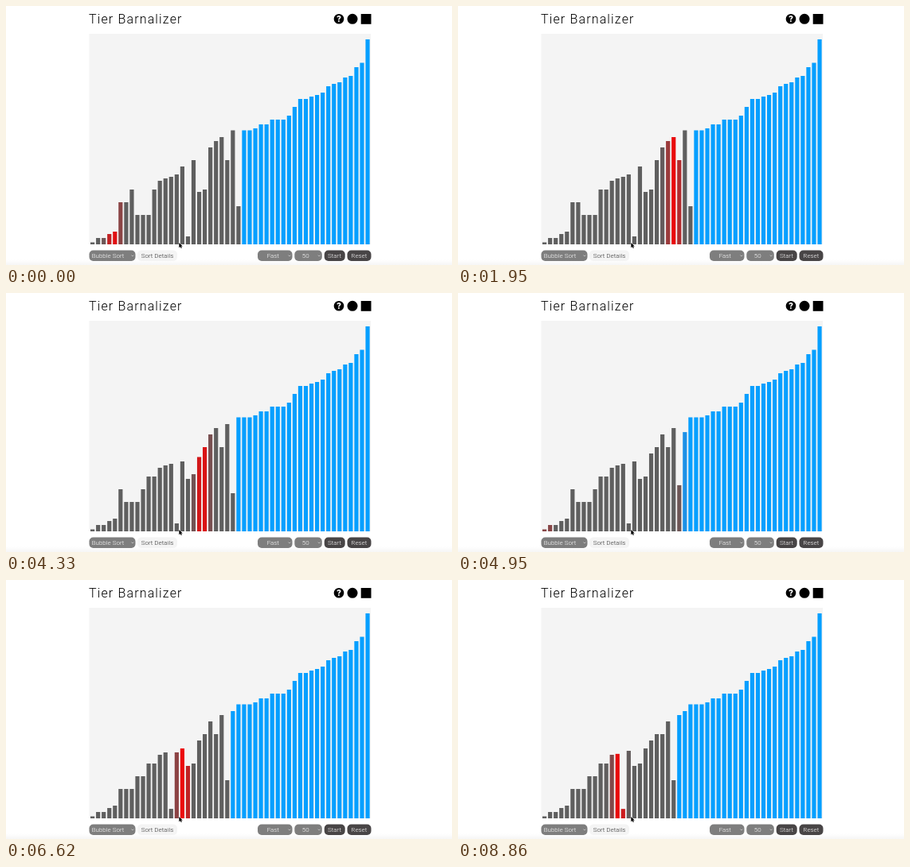
Animation, 560 px wide and 326 px high, one loop 8.9 s. Source, as an HTML page with a canvas:

```html
<!DOCTYPE html>
<html lang="en">
<head>
<meta charset="utf-8">
<title>Tier Barnalizer</title>
<style>
  html, body { margin: 0; width: 100%; height: 100%; overflow: hidden; background: #fff; }
  canvas { display: block; width: 560px; height: 326px; }
</style>
</head>
<body>
<canvas id="stage"></canvas>
<script>
const W = 560, H = 326, LOOP = 8900, FPS = 21;
const STEP = 101.1, FADE = 250, BEGIN = -50 - 4 * STEP;
const BASE = 300, LEFT = 106, PITCH = 7.05, BAR = 5.2;
const GREY = [95, 95, 95], RED = [240, 5, 8], BLUE = [6, 159, 255];
const FONT = 'Roboto, "Open Sans", sans-serif';

const heights = [
  2.5, 8, 8, 13, 16, 53, 53, 69, 37, 37, 37, 69, 80, 83, 85, 88, 98, 10, 106, 66, 69, 122, 130, 135, 106,
  143.5, 48, 143.5, 143.5, 146, 151, 151, 157, 157, 157, 162, 173, 183, 183, 186, 188, 191, 199, 202, 204,
  210, 212, 223, 228.5, 258
];
const FIRST_SORTED = 27, PASSES = 4;

const canvas = document.getElementById('stage');
const ctx = canvas.getContext('2d');
const dpr = window.devicePixelRatio || 1;
canvas.width = W * dpr;
canvas.height = H * dpr;

// cubic-bezier(.25, .1, .25, 1)
function ease(x) {
  if (x <= 0) return 0;
  if (x >= 1) return 1;
  let lo = 0, hi = 1, u = x;
  for (let i = 0; i < 24; i++) {
    u = (lo + hi) / 2;
    const bx = 0.75 * u * (1 - u) * (1 - u) + 0.75 * u * u * (1 - u) + u * u * u;
    if (bx < x) lo = u; else hi = u;
  }
  return 0.3 * u * (1 - u) * (1 - u) + 3 * u * u * (1 - u) + u * u * u;
}

const same = (a, b) => a.every((v, i) => Math.abs(v - b[i]) < 1e-6);
const newTrack = v => [{ t: -1e6, from: v, to: v, dur: 1, back: v, k: 1 }];
const progress = (seg, t) => ease((t - seg.t) / seg.dur);

function valueAt(track, t) {
  let i = track.length - 1;
  while (i > 0 && track[i].t > t) i--;
  const seg = track[i], p = progress(seg, t);
  return seg.from.map((v, n) => v + (seg.to[n] - v) * p);
}

// Starts a new transition; turning back midway takes proportionally less time.
function retarget(track, t, to) {
  const last = track[track.length - 1];
  if (same(last.to, to)) return;
  const p = progress(last, t), from = valueAt(track, t);
  if (p < 1 && same(last.back, to)) {
    const k = p * last.k + 1 - last.k;
    track.push({ t, from, to, dur: FADE * k, back: last.to, k });
  } else {
    track.push({ t, from, to, dur: FADE, back: from, k: 1 });
  }
}

const sizes = heights.map(h => newTrack([h]));
const tints = heights.map((h, i) => newTrack(i < FIRST_SORTED ? GREY : BLUE));

function bubbleSort() {
  const a = heights.slice();
  let t = BEGIN;
  for (let pass = 0; pass < PASSES; pass++) {
    const end = FIRST_SORTED - 1 - pass;
    for (let j = 0; j < end; j++) {
      retarget(tints[j], t, RED);
      retarget(tints[j + 1], t, RED);
      t += STEP;
      if (a[j] > a[j + 1]) {
        [a[j], a[j + 1]] = [a[j + 1], a[j]];
        retarget(sizes[j], t, [a[j]]);
        retarget(sizes[j + 1], t, [a[j + 1]]);
      }
      retarget(tints[j], t, GREY);
    }
    retarget(tints[end], t, BLUE);
    t += STEP;
  }
}

function text(str, x, y, size, color, weight = 300, align = 'left', spacing = 0) {
  ctx.font = `${weight} ${size}px ${FONT}`;
  ctx.letterSpacing = spacing + 'px';
  ctx.textAlign = align;
  ctx.fillStyle = color;
  ctx.fillText(str, x, y);
}

function disc(x, y, r) {
  ctx.fillStyle = '#000';
  ctx.beginPath();
  ctx.arc(x, y, r, 0, Math.PI * 2);
  ctx.fill();
}

function button(label, x, w, fill, color, labelX, chevron) {
  ctx.fillStyle = fill;
  ctx.beginPath();
  ctx.roundRect(x, 307.5, w, 13.5, 5);
  ctx.fill();
  text(label, labelX, 317, 8, color, 300, 'center');
  if (!chevron) return;
  const cx = x + w - 3.6;
  ctx.strokeStyle = '#ddd';
  ctx.lineWidth = 0.7;
  ctx.beginPath();
  ctx.moveTo(cx - 1.4, 313.6);
  ctx.lineTo(cx, 315);
  ctx.lineTo(cx + 1.4, 313.6);
  ctx.stroke();
}

function drawHeader() {
  text('Tier Barnalizer', 104, 22, 16, '#000', 300, 'left', 1.15);
  disc(418, 16.3, 6.3);
  text('?', 418, 20.4, 11, '#fff', 900, 'center');
  disc(435, 16.3, 6.5);
  ctx.fillRect(445.7, 10, 12.8, 12.8);
}

function drawControls() {
  const shade = ctx.createLinearGradient(0, 319, 0, H);
  shade.addColorStop(0, '#fff');
  shade.addColorStop(1, '#f6f6f6');
  ctx.fillStyle = shade;
  ctx.fillRect(0, 319, W, H - 319);
  button('Bubble Sort', 104.5, 58, '#7e7e7e', '#fff', 128, true);
  button('Sort Details', 165, 50, '#f4f4f4', '#333', 190);
  button('Fast', 316, 43.5, '#7e7e7e', '#fff', 335.3, true);
  button('50', 362.3, 34.5, '#7e7e7e', '#fff', 376.3, true);
  button('Start', 399.7, 26, '#484546', '#fff', 412.5);
  button('Reset', 428.5, 30, '#484546', '#fff', 443.3);
}

function drawPointer() {
  const tip = [[0, 0], [0, 6.4], [1.5, 5.1], [2.5, 7.2], [3.5, 6.7], [2.6, 4.7], [4.5, 4.5]];
  ctx.beginPath();
  tip.forEach(([x, y]) => ctx.lineTo(217.3 + x, 297.9 + y));
  ctx.closePath();
  ctx.strokeStyle = '#fff';
  ctx.lineWidth = 0.9;
  ctx.stroke();
  ctx.fillStyle = '#000';
  ctx.fill();
}

function draw(t) {
  ctx.setTransform(dpr, 0, 0, dpr, 0, 0);
  ctx.fillStyle = '#fff';
  ctx.fillRect(0, 0, W, H);
  drawHeader();
  ctx.fillStyle = '#f4f4f4';
  ctx.fillRect(104.5, 35, 353.5, BASE - 35);
  heights.forEach((_, i) => {
    const [h] = valueAt(sizes[i], t);
    ctx.fillStyle = `rgb(${valueAt(tints[i], t).map(Math.round).join(',')})`;
    ctx.fillRect(LEFT + i * PITCH, BASE - h, BAR, h);
  });
  drawControls();
  drawPointer();
}

const start = performance.now();
function tick() {
  const t = (performance.now() - start) % LOOP;
  draw(Math.floor((t + 5) * FPS / 1000) * 1000 / FPS);
  requestAnimationFrame(tick);
}

bubbleSort();
tick();
</script>
</body>
</html>
```
